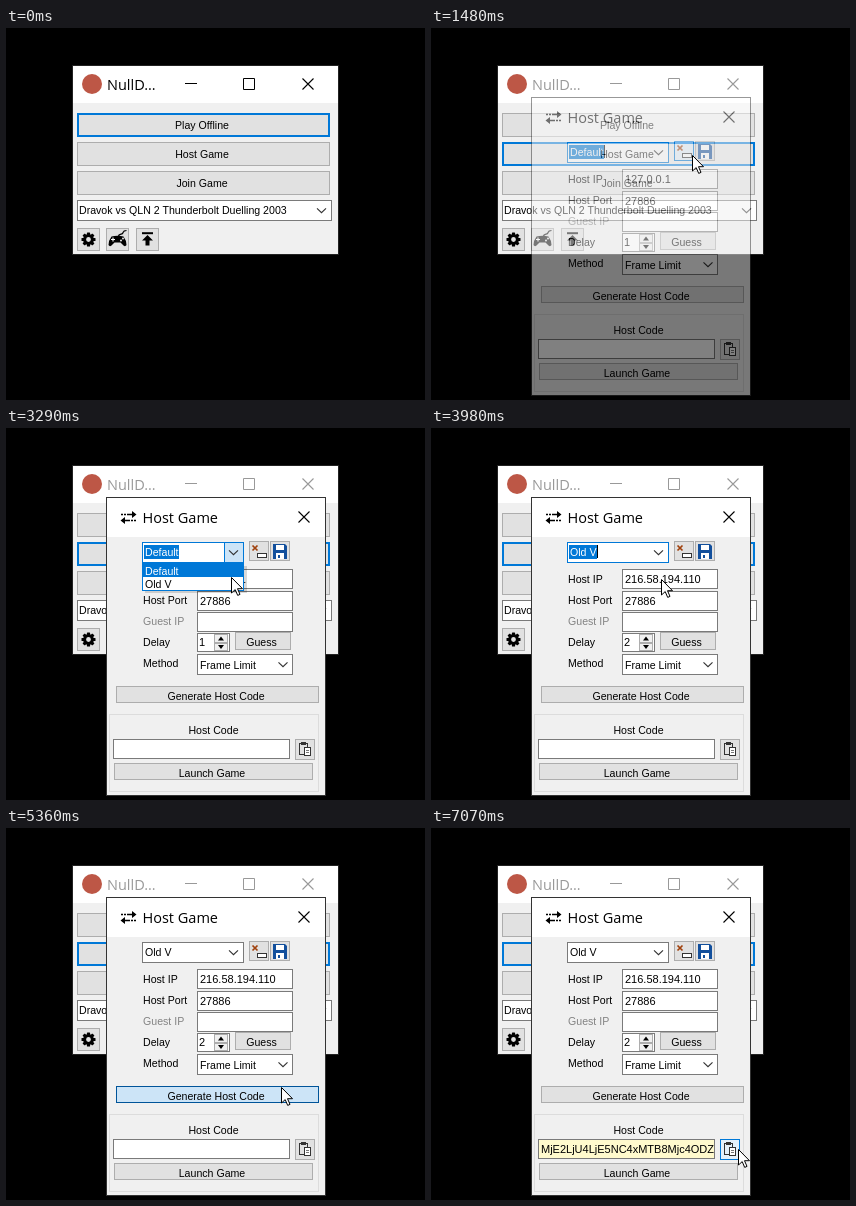
Write an HTML page that moves like this. It is 419 px wide and 372 px high and loops after 8000 ms.

```html
<!DOCTYPE html>
<html lang="en">
<head>
<meta charset="utf-8">
<title>Host Game</title>
<style>
  html, body { margin: 0; width: 100%; height: 100%; overflow: hidden; background: #000; }
  svg { display: block; width: 419px; height: 372px; }
  text { font: 10.6px "Liberation Sans", Arial, sans-serif; white-space: pre; }
  text.num { font-size: 11px; }
  text.title { font: 14.5px "Open Sans", "Noto Sans", sans-serif; }
</style>
</head>
<body>
<svg id="stage" viewBox="0 0 419 372"></svg>
<script>
const LOOP = 8000;
const BLUE = '#0078d7', GREY = '#adadad', FACE = '#e1e1e1', PANEL = '#f0f0f0';
const GAME = 'Dravok vs QLN 2 Thunderbolt Duelling 2003';
const PROFILE = 'Old V';
const HOST_CODE = 'MjE2LjU4LjE5NC4xMTB8Mjc4ODZ8';
const stage = document.getElementById('stage');

// Each move: start, end, steps, target, optional bend point.
const ENTRY = [419, 266];
const MOVES = [
  [300, 1010, 10, [261, 127], [330, 160]],
  [2190, 2700, 7, [228, 123], [244, 104]],
  [3150, 3290, 3, [225, 149]],
  [3370, 3440, 2, [230, 151]],
  [4210, 4750, 8, [270, 217], [246, 172]],
  [4830, 4990, 3, [276, 250]],
  [5070, 5140, 2, [275, 259]],
  [5910, 6080, 3, [300, 278]],
  [6160, 6690, 8, [307, 321], [308, 298]]
];

// Hit boxes: x, y, width, height.
const BOX = {
  offline: [71, 85, 253, 24], host: [71, 114, 253, 24], join: [71, 143, 253, 24],
  remove: [243, 113, 20, 20], save: [264, 113, 20, 20],
  guess: [229, 204, 56, 18], generate: [110, 258, 203, 17],
  copy: [289, 311, 20, 21], launch: [108, 335, 199, 17]
};

const between = (t, a, b) => t >= a && t < b;
const inside = ([x, y, w, h], [px, py]) => px >= x && px < x + w && py >= y && py < y + h;
const ease = p => p * (1.7 - 0.7 * p);

function pointer(t) {
  let from = ENTRY;
  for (const [start, end, steps, to, bend] of MOVES) {
    if (t < start) break;
    const done = Math.floor((t - start) * (steps - 1) / (end - start) + 1e-6) + 1;
    const p = ease(Math.min(1, done / steps)), q = 1 - p;
    const origin = from;
    from = to.map((end, i) => {
      const mid = bend ? bend[i] : (origin[i] + end) / 2;
      return Math.round(q * q * origin[i] + 2 * q * p * mid + p * p * end);
    });
  }
  return from;
}

const fill = (x, y, w, h, color) => `<rect x="${x}" y="${y}" width="${w}" height="${h}" fill="${color}"/>`;
const frame = (x, y, w, h, color, line, weight = 1) =>
  `<rect x="${x + weight / 2}" y="${y + weight / 2}" width="${w - weight}" height="${h - weight}" fill="${color}" stroke="${line}" stroke-width="${weight}"/>`;
const path = (d, line = '#000', weight = 1, color = 'none') =>
  `<path d="${d}" stroke="${line}" stroke-width="${weight}" fill="${color}"/>`;
const text = (x, y, s, color = '#000', kind = '') =>
  `<text x="${x}" y="${y}" fill="${color}" class="${kind}">${s}</text>`;
const centered = (x, y, s) => `<text x="${x}" y="${y}" text-anchor="middle">${s}</text>`;
const chevron = (x, y) => path(`M${x - 4.5} ${y - 2.2}l4.5 4.4l4.5 -4.4`, '#333', 1.1);
const cross = (x, y, r, color) => path(`M${x - r} ${y - r}l${2 * r} ${2 * r}m0 ${-2 * r}l${-2 * r} ${2 * r}`, color, 1.1);

function button(box, state = '') {
  const [face, line, weight] = {
    pressed: ['#cce4f7', '#005499', 1],
    hover: ['#e5f1fb', BLUE, 1],
    focus: [FACE, BLUE, 2]
  }[state] || [FACE, GREY, 1];
  return frame(...box, face, line, weight);
}

const field = (x, y, w, h, color = '#fff') => frame(x, y, w, h, color, '#7a7a7a');

function gear(x, y) {
  let teeth = '';
  for (let i = 0; i < 8; i++)
    teeth += `<rect x="-1.6" y="-7" width="3.2" height="4" rx=".6" transform="rotate(${i * 45})"/>`;
  return `<g transform="translate(${x} ${y})">${teeth}<circle r="3.9" fill="none" stroke="#000" stroke-width="3"/></g>`;
}

function gamepad(x, y) {
  return `<g transform="translate(${x} ${y})">` +
    path('M1 -3c0 -3 3 -2 4 -3s0 -3 4 -3', '#000', 1.2) +
    path('M-6 -3Q0 -4.5 6 -3Q9 1 9 5.5Q7.5 8 5 5L3 3H-3L-5 5Q-7.5 8 -9 5.5Q-9 1 -6 -3Z', 'none', 0, '#000') +
    path('M-6.5 0h4m-2 -2v4', '#fff', 1.1) +
    '<circle cx="3.5" cy="1" r=".9" fill="#fff"/><circle cx="5.5" cy="-1" r=".9" fill="#fff"/></g>';
}

function mainWindow(t, mouse) {
  const active = t < 1410, ink = active ? '#000' : '#999';
  const focus = t < 1330 ? 'offline' : 'host';
  const state = name => {
    if (active && name === 'host' && t >= 1330) return 'pressed';
    if (active && t >= 300 && inside(BOX[name], mouse)) return name === focus ? 'focus' : 'hover';
    return name === focus ? 'focus' : '';
  };
  let out = frame(66, 37, 267, 190, PANEL, '#222') + fill(67, 38, 265, 37, '#fff') +
    '<circle cx="86" cy="56" r="10" fill="#bd5746"/>' +
    text(101, 62, 'NullD...', ink, 'title') +
    path('M179 55.5h12M237.5 50.5h11v11h-11z', ink) + cross(302, 56, 5.5, ink);
  [['offline', 'Play Offline'], ['host', 'Host Game'], ['join', 'Join Game']].forEach(([name, label], i) => {
    out += button(BOX[name], state(name)) + centered(196, 101 + i * 29, label);
  });
  out += field(71, 172, 255, 21) + text(73, 186, GAME) + chevron(315.5, 182.5);
  for (const x of [71, 100, 130]) out += button([x, 200, 23, 23]);
  return out + gear(82.5, 211.5) + gamepad(111.5, 211.5) +
    path('M136 205.2h11', '#000', 2) + path('M141.5 207l5.5 5.5h-3.5v5h-4v-5h-3.5z', 'none', 0, '#000');
}

function profileBox(t) {
  const chosen = t >= 3670, focused = t < 5300, open = between(t, 2920, 3670);
  const name = chosen ? PROFILE : 'Default';
  const edge = chosen ? 166 : 173;
  let out = frame(136, 114, 102, 21, '#fff', focused ? BLUE : '#7a7a7a');
  if (between(t, 2780, 3670)) out += frame(218, 114, 20, 21, '#cce4f7', BLUE);
  if (focused) {
    out += fill(138, 117, edge - 138, 14, BLUE);
    const blinkStart = chosen ? 3670 : 1510;
    if ((t - blinkStart) % 1060 < 530) out += fill(edge, 117, 1, 13, '#000');
  }
  out += text(139, 128, name, focused ? '#fff' : '#000') + chevron(227.5, 124.5);
  return { box: out, list: open ? profileList(t) : '' };
}

function profileList(t) {
  const picked = t >= 3370 ? 1 : 0;
  const rows = ['Default', PROFILE].map((name, i) =>
    (i === picked ? fill(137, 136 + i * 13, 100, 13, BLUE) : '') +
    text(139, 146.5 + i * 13, name, i === picked ? '#fff' : '#000'));
  return fill(139, 138, 102, 27, 'rgba(0,0,0,.15)') + frame(136, 135, 102, 28, '#fff', BLUE) + rows.join('');
}

function hostDialog(t, mouse) {
  const chosen = t >= 3830;
  const pressed = between(t, 5300, 5450) ? 'generate' : between(t, 6770, 6920) ? 'copy' : '';
  const focus = between(t, 5300, 6770) ? 'generate' : '';
  const state = name => name === pressed ? 'pressed' : inside(BOX[name], mouse) ? 'hover' : name === focus ? 'focus' : '';
  const profile = profileBox(t);
  const opacity = t < 1490 ? 0.5 : t < 1570 ? 0.85 : 1;

  return `<g opacity="${opacity}">` +
    frame(100, 69, 220, 299, PANEL, '#333') + fill(101, 70, 218, 39, '#fff') +
    path('M115 86.5h2m1 0h2m1 0h8M130 92.5h-2m-1 0h-2m-1 0h-8', '#000', 1.5) +
    path('M126 83l4.5 3.5l-4.5 3.5zM119 89l-4.5 3.5l4.5 3.5z', 'none', 0, '#000') +
    text(136.5, 95, 'Host Game', '#000', 'title') + cross(298, 89, 5.5, '#000') +

    profile.box + button(BOX.remove, state('remove')) + button(BOX.save, state('save')) +
    path('M246.5 117.5l5 5m0 -5l-5 5', '#a0410d', 1.7) +
    frame(251, 125, 10, 5, '#fff', '#333') +
    path('M267 116h12l2 2v13h-14z', 'none', 0, '#124f9c') +
    fill(270, 117, 8, 5, '#fff') + fill(270, 125, 8, 6, '#fff') + fill(272, 127, 2, 3, '#124f9c') +

    text(137, 155, 'Host IP') + field(191, 141, 96, 20) +
    text(194, 155, chosen ? '216.58.194.110' : '127.0.0.1', '#000', 'num') +
    text(137, 176, 'Host Port') + field(191, 163, 96, 20) + text(194, 177, '27886', '#000', 'num') +
    text(137, 197, 'Guest IP', '#838383') + field(191, 184, 96, 20) +
    text(137, 218, 'Delay') + field(191, 205, 33, 19) + text(193, 218, chosen ? '2' : '1', '#000', 'num') +
    frame(208, 206, 14, 9, PANEL, GREY) + frame(208, 215, 14, 8, PANEL, GREY) +
    path('M212 212.5l3 -4l3 4zM212 217l3 4l3 -4z', 'none', 0, '#000') +
    button(BOX.guess, state('guess')) + centered(255.5, 217.5, 'Guess') +
    text(137, 239, 'Method') + field(191, 226, 96, 21) + text(194, 240.5, 'Frame Limit') + chevron(277, 236.5) +
    button(BOX.generate, state('generate')) + centered(210, 271.5, 'Generate Host Code') +

    frame(103, 286, 210, 78, 'none', '#dcdcdc') + centered(207.5, 305.5, 'Host Code') +
    field(107, 311, 177, 20, t >= 6920 ? '#fffacd' : '#fff') +
    (t >= 5450 ? `<g clip-path="url(#code)">${text(110, 325, HOST_CODE, '#000', 'num')}</g>` : '') +
    button(BOX.copy, state('copy')) +
    frame(293, 315, 9, 12, 'none', '#333') + fill(295, 314, 5, 3, '#333') + frame(298, 319, 7, 9, '#fff', '#333') +
    path('M300 322.5h3m-3 2h3', '#777') +
    button(BOX.launch, state('launch')) + centered(206, 348.5, 'Launch Game') +
    profile.list + '</g>';
}

const arrow = ([x, y]) => `<g transform="translate(${x} ${y})">` +
  path('M.5 .5V16L4.2 12.6L6.7 18.4L9 17.4L6.5 11.7H11.5Z', '#000', 1, '#fff') + '</g>';

const DEFS = '<clipPath id="code"><rect x="108" y="312" width="175" height="18"/></clipPath>';
let shown = '';

function render(t) {
  const mouse = pointer(t);
  const picture = DEFS + fill(0, 0, 419, 372, '#000') + mainWindow(t, mouse) +
    (t >= 1410 ? hostDialog(t, mouse) : '') + (t >= 300 ? arrow(mouse) : '');
  if (picture !== shown) stage.innerHTML = shown = picture;
}

const begin = performance.now();
function tick() {
  render((performance.now() - begin) % LOOP);
  requestAnimationFrame(tick);
}
tick();
</script>
</body>
</html>
```
